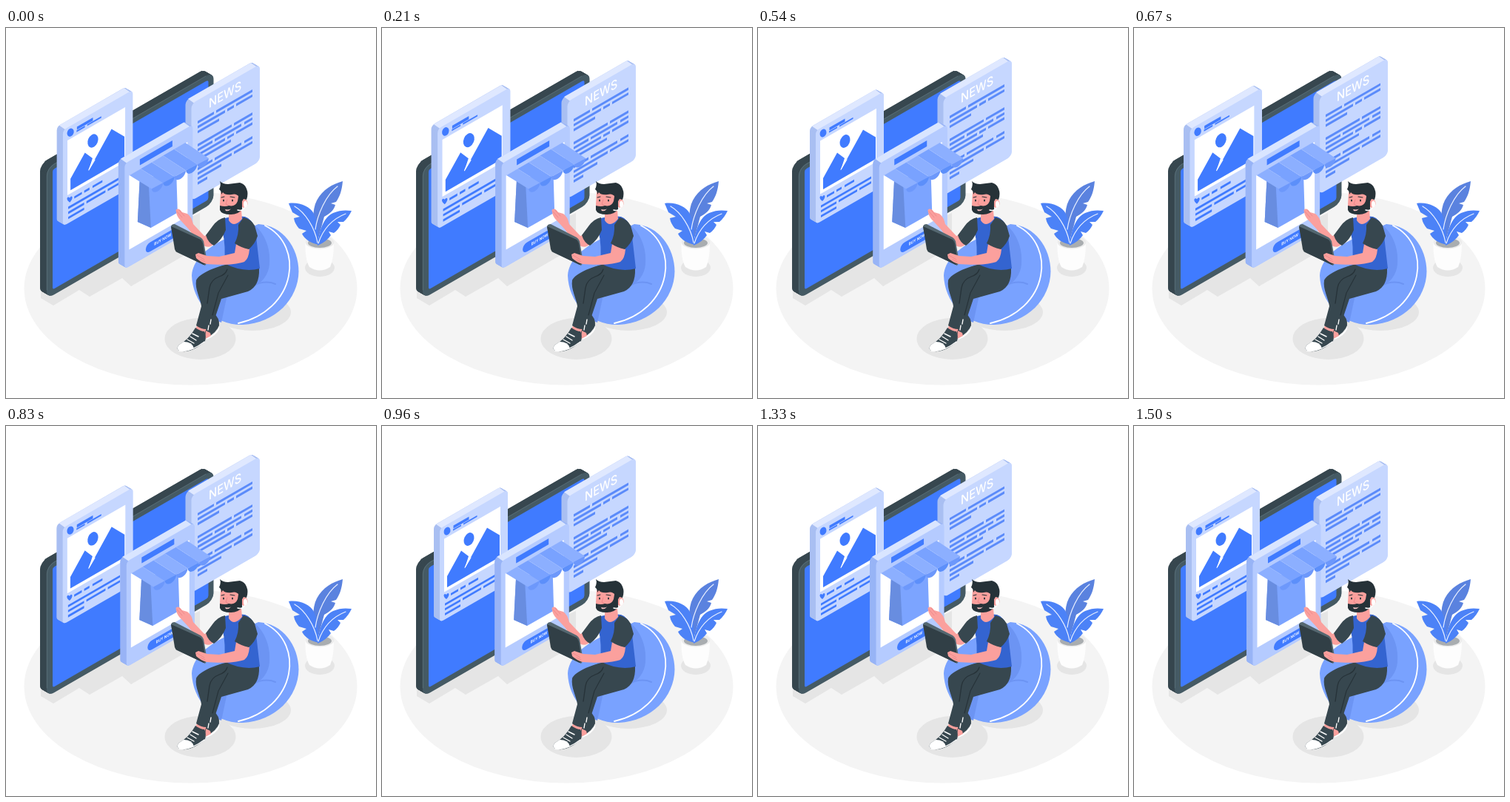
An HTML page with a canvas for the animation above (1.54 s loop, 500 px wide and 500 px high).

```html
<!DOCTYPE html>
<html lang="en">
<head>
<meta charset="utf-8">
<title>Online shop</title>
<style>
  html, body { margin: 0; width: 100%; height: 100%; overflow: hidden; background: #fff; }
  canvas { display: block; width: 500px; height: 500px; }
</style>
</head>
<body>
<canvas id="stage"></canvas>
<script>
const canvas = document.getElementById('stage');
const ctx = canvas.getContext('2d');
const ratio = window.devicePixelRatio || 1;
canvas.width = canvas.height = 500 * ratio;

const LOOP = 1540, STEPS = 37, SLOPE = 0.577;
const BLUE = '#407bff', PALE = '#c6d7ff', SIDE = '#a9bff2', TOP = '#dfe8ff';
const DARK = '#263238', SLATE = '#37474f', SKIN = '#fba09d', WHITE = '#fff';

function fill(d, color) {
  ctx.fillStyle = color;
  ctx.fill(new Path2D(d));
}

function line(d, color, width) {
  ctx.strokeStyle = color;
  ctx.lineWidth = width;
  ctx.lineCap = ctx.lineJoin = 'round';
  ctx.stroke(new Path2D(d));
}

function ellipse(x, y, rx, ry, color, turn = 0) {
  ctx.fillStyle = color;
  ctx.beginPath();
  ctx.ellipse(x, y, rx, ry, turn, 0, Math.PI * 2);
  ctx.fill();
}

// Upright isometric rectangle; (x, y) is its top left corner.
function bar(x, y, w, h, color, r = 0) {
  ctx.save();
  ctx.transform(1, -SLOPE, 0, 1, x, y);
  ctx.fillStyle = color;
  ctx.beginPath();
  ctx.roundRect(0, 0, w, h, r);
  ctx.fill();
  ctx.restore();
}

function slab(x, y, w, h, r, depth, side, top, front) {
  for (let s = depth; s > 0; s -= 0.5) bar(x - s, y - s * SLOPE, w, h, side, r);
  const x1 = x + r * 0.6, x2 = x + w - r * 0.7;
  const at = px => y - (px - x) * SLOPE;
  const lift = depth * SLOPE;
  fill(`M${x1} ${at(x1) + 1}L${x2} ${at(x2) + 1}L${x2 - depth} ${at(x2) - lift}L${x1 - depth} ${at(x1) - lift}Z`, top);
  bar(x, y, w, h, front, r);
}

function isoText(text, x, y, size, weight) {
  ctx.save();
  ctx.transform(0.866, -0.5, 0, 1, x, y);
  ctx.font = `${weight} ${size}px Inter, sans-serif`;
  ctx.fillStyle = WHITE;
  ctx.fillText(text, 0, 0);
  ctx.restore();
}

// Row of bars given as [start, end] pairs, all on one slanted line.
function row(x0, y0, h, color, spans) {
  for (const [a, b] of spans) bar(a, y0 - (a - x0) * SLOPE, b - a, h, color);
}

function drawFloor() {
  ellipse(249.5, 352, 225, 130.5, '#f4f4f4');
  fill('M47 350V365L64 375L99 354L113 363L157 338L169 349L262 295L262 250Z', '#e5e5e5');
  ellipse(333, 384, 52, 25, '#e5e5e5');
  ellipse(262.5, 420, 48, 28, '#e5e5e5');
  ellipse(424, 324, 20, 12, '#e5e5e5');
}

function drawMonitor() {
  slab(55, 189, 225.5, 177, 10, 9, SLATE, SLATE, '#455a64');
  line('M55.3 354V200Q56 190 65 184L270 65', '#627780', 0.7);
  bar(63, 191.5, 210.5, 162, BLUE, 3);
}

function drawPost(scale) {
  ctx.save();
  ctx.translate(120, 172.5);
  ctx.scale(scale, scale);
  ctx.translate(-120, -172.5);
  slab(78, 139, 92, 126.5, 5, 8, SIDE, TOP, PALE);
  ellipse(88, 142, 4.2, 5.6, BLUE, 0.4);
  bar(96.5, 134.5, 21, 4, BLUE);
  row(96, 139.5, 2, BLUE, [[96, 107], [110, 128.5]]);
  bar(84, 152.5, 76, 72, WHITE);
  fill('M88 203L107 168.500L117 176L112 192L142 137.500L159 147.500V177L88 218Z', BLUE);
  line('M119 174.500L112 191.500L120 178', WHITE, 1);
  ellipse(117.5, 153, 6.5, 9.3, BLUE, 0.4);
  fill('M87 234C81 230 84 225 87 228C90 223 93 228 87 234Z', BLUE);
  row(93, 226, 3, BLUE, [[93, 103], [106, 113], [117, 130]]);
  row(85, 239.8, 3, BLUE, [[85, 153]]);
  row(85, 246.3, 3, BLUE, [[85, 106], [109, 134], [137, 153]]);
  row(85, 253, 3, BLUE, [[85, 106]]);
  ctx.restore();
}

function drawNews(dy) {
  const ink = '#5b8bfa';
  const full = [
    [[259, 281], [284, 333]],
    [[259, 296], [299, 308], [311, 333]],
    [[259, 305], [308, 333]],
    [[259, 279], [282, 318], [322, 333]]
  ];
  const rows = [
    [0, full[0]], [6.6, full[1]], [13.2, [[259, 288]]],
    [31, full[2]], [37.6, full[3]], [44.2, full[1]], [50.8, [[259, 304]]],
    [63, full[3]], [69.6, full[2]], [76.2, [[259, 291]]], [82.5, [[259, 272]]]
  ];
  ctx.save();
  ctx.translate(0, dy);
  slab(250.5, 103, 92.5, 131, 6, 8, SIDE, TOP, PALE);
  isoText('NEWS', 274, 109, 17, 500);
  for (const [y, spans] of rows) row(259, 126.3 + y, 3.4, ink, spans);
  ctx.restore();
}

function drawAwning() {
  const back = i => [167 + 15.1 * i, 199 - 8.8 * i];
  const front = i => [197 + 15.4 * i, 217.5 - 8.3 * i];
  for (let i = 0; i < 5; i++) {
    const [ax, ay] = front(i), [bx, by] = front(i + 1);
    fill(`M${back(i)}L${back(i + 1)}L${bx} ${by}L${ax} ${ay}Z`, i % 2 ? '#79a2ff' : '#8cafff');
    fill(`M${ax} ${ay}C${ax + 1} ${ay + 9} ${bx - 1} ${by + 11} ${bx} ${by}Z`, i % 2 ? '#5c8ffa' : '#6d98fb');
  }
}

function drawShop(dx) {
  ctx.save();
  ctx.translate(dx, 0);
  slab(160.5, 183.5, 92, 142.5, 5, 8.5, '#98b4f6', '#d9e5ff', '#b5cbff');
  bar(181, 177.5, 44, 8, BLUE);
  bar(166.5, 199.5, 79, 100, WHITE);
  fill('M181 202L178 262L196 270L232 249.500L230.500 200Z', '#7ca4ff');
  fill('M181 202L178 262L196 270L193 212Z', '#688de0');
  drawAwning();
  bar(189, 293, 46, 12.5, BLUE, 6);
  isoText('BUY NOW', 200.5, 294, 5.4, 600);
  ctx.restore();
}

function drawPlant() {
  fill('M404.5 290Q404 313 410 323Q424 332 438 323Q443 312 443 290Z', '#fdfdfd');
  ellipse(424, 289.5, 19.3, 9, '#ececec');
  ellipse(424, 290.5, 16, 6.5, '#a9adb0');
  fill('M417 284C415 268 413 246 420 233C428 218 441 211 455 207C454 219 451 228 446 235L439 237L445 239C443 247 437 251 430 255L421 288Z', '#5a82df');
  fill('M423 293C412 291 403 285 400 278L406 274L396 271Q390 264 389 257L397 255L387 249L382 237C396 235 411 241 416 251C422 264 421 276 423 293Z', '#4c82f7');
  fill('M421 294C423 274 429 256 442 250C451 246 459 246 467 247Q463 256 456 262L448 262L452 266Q449 273 443 277L436 275L439 280Q433 289 421 294Z', '#4c82f7');
  line('M421 290C417 269 404 249 390 241', '#e8efff', 1.2);
  line('M418 272C421 252 432 226 448 214', '#e8efff', 1.2);
  line('M422 291C429 270 441 258 459 251', '#e8efff', 1.2);
}

function drawBag() {
  fill('M341 265C374 267 395 296 395.500 329C395 366 364 399 320 401C281 402 252 371 251 334C252 316 268 298 298 284Z', '#79a2ff');
  fill('M335 266C350 277 358 299 356 319C355 333 346 345 333 350L300 356L291 398Q277 393 268 383L292 318Z', '#6c94f3');
  line('M332 349Q350 340 364 346', '#6c94f3', 2);
  line('M350 267C378 281 387 310 382 335C376 366 350 391 314 399', WHITE, 1.8);
}

function drawShoes() {
  fill('M273 391L281 386Q289 392 288 402Q285 411 271 419L266 414Z', SLATE);
  line('M277 394L276 400M274 402L273 408', WHITE, 1.4);
  fill('M271 419Q286 412 288 403V407Q284 416 271 421Z', WHITE);
  fill('M259 400L271 406L268 413L256 407Z', SKIN);
  fill('M270 409L276 412L277 416L269 420Z', SKIN);
  fill('M256 405Q263 410 268 410Q271 417 269 423C259 433 245 440 234 436Q229 433 234 428Q247 421 256 405Z', SLATE);
  fill('M240 424Q252 424 254 433Q241 439 234 436Q229 433 234 428Z', WHITE);
  line('M252 413L260 417M249 417L257 422M245 421L254 426', WHITE, 1.4);
  line('M234 436.500Q250 438 268 424', WHITE, 1.2);
}

function drawBody() {
  fill('M300 319C280 324 261 332 257 341C255 353 263 366 264 376L257 402Q263 407 271 407L277 391L283 390L291 366L327 356Q343 349 342 325Z', SLATE);
  line('M299 326Q297 333 288 336Q277 340 275 351L272 372', DARK, 1.3);
  line('M279 388L287 358L300 334', DARK, 1.1);
  fill('M296 257Q308 253 323 255Q333 258 337 273L343 325Q320 331 295 318Q297 294 293 277Z', '#3464d0');
  fill('M301 249L318 246L319 258Q308 271 301 260Z', SKIN);
  // Raised arm
  fill('M271 280L283 290Q276 298 269 295C260 289 253 280 247 272L237 261C231 256 230 250 229.500 246Q233 242 238 249L245 251Q251 255 253 265L268 281Z', SKIN);
  line('M231 248L238 256M234 246L241 254', '#e98287', 0.7);
  fill('M296 256Q286 258 279 268L270 280Q273 290 281 294Q292 286 297 273Z', SLATE);
}

function drawTablet() {
  fill('M223 269Q223 265 228 265L263 283Q266 285 267 288L272 317L269 321L230 302Z', '#546770');
  fill('M223 268L263 286Q265 288 266 291L270 318L267 320L231 303Q229 302 228 299Z', '#313f46');
  fill('M311 292L329 299Q328 312 322 316C307 321 285 320 271 319Q262 316 257 311L256 306L260 304L272 308L288 309L309 304Z', SKIN);
  line('M258 307L268 313M263 313L269 316', '#e98287', 0.7);
  fill('M321 256Q331 258 336 267L340 281Q337 291 328 299Q318 297 309 291Q315 279 314 266Z', SLATE);
}

function drawHead() {
  fill('M290 222L317 219L321 232L318 246Q310 253 299 251Q289 249 289 239Z', SKIN);
  ellipse(322, 237, 4.5, 6, SKIN);
  fill('M289 240Q296 242 301 240Q310 242 313 234L315 222L319 230L319 245Q314 252 304 252Q291 252 289 246Z', DARK);
  fill('M291 225Q291 220 288 218Q291 212 289 207Q293 211 300 211L316 209Q323 211 325 217Q328 224 325 232L321 231L318 236L315 235V228Q311 223 305 225Q296 226 293 222Z', DARK);
  fill('M296 245Q300 246 304 244.500Q301 248 297 247Z', '#f5c3c3');
  ellipse(294, 233, 1, 1.5, DARK);
  ellipse(306, 233, 1, 1.5, DARK);
  line('M291 229L295 228M303 228L309 229', DARK, 1.1);
  line('M299 232L297 238L300 239', '#e98287', 0.8);
  line('M323 242Q320 248 313 246', WHITE, 1.5);
  ellipse(323.5, 238, 2.5, 4.5, WHITE);
}

const easeInOut = u => u < 0.5 ? 2 * u * u : 1 - 2 * (1 - u) ** 2;

// Interpolates between [time, value] keys.
function track(p, keys, ease = u => u) {
  const i = Math.max(1, keys.findIndex(k => k[0] >= p));
  const [t0, v0] = keys[i - 1], [t1, v1] = keys[i];
  return v0 + (v1 - v0) * ease((p - t0) / (t1 - t0));
}

const BEAT = [[0, 1], [0.1, 1.1], [0.3, 1], [0.4, 1], [0.5, 1.1], [0.6, 1], [1, 1]];
const FLOAT = [[0, 0], [0.5, -10], [1, 0]];
const SHAKE = [0, -1, 2, -4, 4, -4, 4, -4, 2, -1, 0].map((v, i) => [i / 10, v]);

function draw(ms) {
  const step = Math.floor((ms % LOOP + 3) * STEPS / LOOP) % STEPS;
  const p = (step + 1) / STEPS;
  ctx.setTransform(ratio, 0, 0, ratio, 0, 0);
  ctx.fillStyle = WHITE;
  ctx.fillRect(0, 0, 500, 500);
  drawFloor();
  drawMonitor();
  drawPost(track(p, BEAT));
  drawNews(track(p, FLOAT));
  drawShop(track(p, SHAKE, easeInOut));
  drawPlant();
  drawBag();
  drawShoes();
  drawBody();
  drawTablet();
  drawHead();
}

const start = performance.now();
function tick() {
  draw(performance.now() - start);
  requestAnimationFrame(tick);
}
tick();
</script>
</body>
</html>
```
